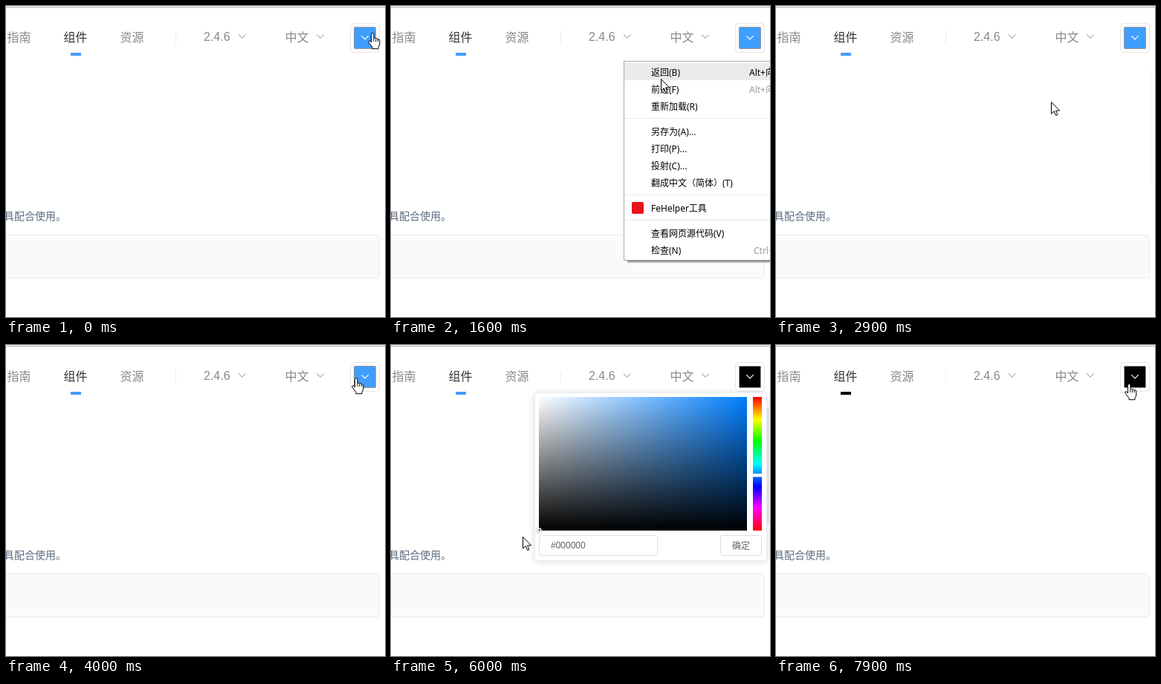
An HTML page that plays this animation: 510x419 px, repeating every 8 s.

```html
<!DOCTYPE html>
<html lang="zh-CN">
<head>
<meta charset="utf-8">
<title>Color picker</title>
<style>
html, body { margin: 0; width: 100%; height: 100%; overflow: hidden; background: #fff; }
svg { display: block; }
text { font-family: "Noto Sans", "Noto Sans CJK SC", "Noto Sans CJK", sans-serif; font-size: 12px; }
.nav text { font-size: 16px; fill: #888; font-family: "Liberation Sans", "Noto Sans CJK SC", "Noto Sans CJK", sans-serif; }
.nav .on { fill: #333; }
.chev { fill: none; stroke: #b4b4b4; stroke-width: 1.1; }
.form { fill: #606266; }
.form text { font-family: "Liberation Sans", "Noto Sans CJK SC", "Noto Sans CJK", sans-serif; }
.form rect { fill: #fff; stroke: #dcdfe6; }
.key { fill: #999; }
.sheet { filter: drop-shadow(5px 2px 1px rgba(0, 0, 0, .5)); }
#popup { transform-origin: 349px 64px; filter: drop-shadow(0 1px 4px rgba(0, 0, 0, .15)); }

#mark, #bar, #menu, #row, #key1, #key2, #popup, #hand, #arrow, #cursor { animation: 8s step-end infinite; }
#mark { animation-name: mark; }
#bar { animation-name: bar; }
#menu { animation-name: menu; }
#row { animation-name: row; }
#key1 { animation-name: key1; }
#key2 { animation-name: key2; }
#popup { animation-name: popup; }
#hand { animation-name: hand; }
#arrow { animation-name: arrow; }
#cursor { animation-name: cursor; }

@keyframes mark { 0% { fill: #409eff; } 87.5%, 100% { fill: #000; } }
@keyframes bar {
  0% { opacity: 0; }
  28.75% { opacity: .03; }
  50% { opacity: 0; }
  66.25% { opacity: .17; }
  96.25%, 100% { opacity: 0; }
}
@keyframes menu {
  0% { visibility: hidden; }
  6.25% { visibility: visible; }
  28.75%, 100% { visibility: hidden; }
}
@keyframes row {
  0% { opacity: 0; transform: translateY(0); }
  8.75% { opacity: 1; transform: translateY(0); }
  21.25% { opacity: 1; transform: translateY(23px); }
  26.25% { opacity: 1; transform: translateY(46px); }
  28.75%, 100% { opacity: 0; transform: translateY(46px); }
}
@keyframes key1 { 0% { fill: #999; } 8.75% { fill: #000; } 21.25%, 100% { fill: #999; } }
@keyframes key2 { 0% { fill: #999; } 21.25% { fill: #000; } 26.25%, 100% { fill: #999; } }
@keyframes popup {
  0% { opacity: 0; transform: scaleY(0); }
  55% { opacity: .6; transform: scaleY(.75); }
  56.25% { opacity: .95; transform: scaleY(.97); }
  57.5% { opacity: 1; transform: none; }
  85% { opacity: .7; transform: scaleY(.85); }
  86.25% { opacity: .2; transform: scaleY(.35); }
  87.5%, 100% { opacity: 0; transform: scaleY(0); }
}
@keyframes hand {
  0% { visibility: visible; }
  1.25% { visibility: hidden; }
  50% { visibility: visible; }
  58.75% { visibility: hidden; }
  82.5% { visibility: visible; }
  86.25% { visibility: hidden; }
  95%, 100% { visibility: visible; }
}
@keyframes arrow {
  0% { visibility: hidden; }
  1.25% { visibility: visible; }
  50% { visibility: hidden; }
  58.75% { visibility: visible; }
  82.5% { visibility: hidden; }
  86.25% { visibility: visible; }
  95%, 100% { visibility: hidden; }
}
/* the pointer advances once every 100 ms */
@keyframes cursor {
  0% { transform: translate(493px, 36px); animation-timing-function: steps(3); }
  3.75% { transform: translate(309px, 75px); }
  6.25% { transform: translate(314px, 77px); }
  7.5% { transform: translate(314px, 77px); animation-timing-function: steps(9); }
  18.75% { transform: translate(362px, 91px); }
  20% { transform: translate(363px, 98px); animation-timing-function: steps(5); }
  26.25% { transform: translate(370px, 129px); }
  36.25% { transform: translate(370px, 129px); animation-timing-function: steps(2); }
  38.75% { transform: translate(386px, 118px); animation-timing-function: steps(9); }
  50% { transform: translate(471px, 44px); }
  57.5% { transform: translate(471px, 44px); animation-timing-function: steps(6); }
  65% { transform: translate(330px, 150px); animation-timing-function: steps(8); }
  75% { transform: translate(177px, 258px); }
  76.25% { transform: translate(177px, 258px); animation-timing-function: steps(5); }
  82.5% { transform: translate(468px, 266px); }
  87.5% { transform: translate(468px, 266px); animation-timing-function: steps(6); }
  95% { transform: translate(475px, 57px); }
  96.25% { transform: translate(475px, 53px); }
  98.75%, 100% { transform: translate(475px, 52px); }
}
</style>
</head>
<body>
<svg width="510" height="419" viewBox="0 0 510 419">
  <defs>
    <linearGradient id="white"><stop stop-color="#fff"/><stop offset="1" stop-color="#fff" stop-opacity="0"/></linearGradient>
    <linearGradient id="black" x2="0" y2="1"><stop stop-opacity="0"/><stop offset="1"/></linearGradient>
    <linearGradient id="hues" x2="0" y2="1">
      <stop stop-color="#f00"/><stop offset=".17" stop-color="#ff0"/><stop offset=".33" stop-color="#0f0"/>
      <stop offset=".5" stop-color="#0ff"/><stop offset=".67" stop-color="#00f"/><stop offset=".83" stop-color="#f0f"/>
      <stop offset="1" stop-color="#f00"/>
    </linearGradient>
  </defs>

  <rect y="1" width="510" height="1" fill="#aaa"/>
  <g class="nav">
    <text x="1.5" y="47.5">指南</text>
    <text class="on" x="77.5" y="47.5">组件</text>
    <text x="153.5" y="47.5">资源</text>
    <text x="266" y="47">2.4.6</text>
    <text x="375.5" y="47.5">中文</text>
  </g>
  <rect id="mark" x="87" y="63" width="14" height="4"/>
  <rect x="228" y="34" width="1" height="16" fill="#ebebeb"/>
  <path class="chev" d="M313 38.5l4.7 4.7 4.7-4.7M418.3 38.5l4.7 4.7 4.7-4.7"/>
  <rect x="463.5" y="23.5" width="39" height="39" rx="4" fill="#fff" stroke="#e6e6e6"/>
  <rect id="swatch" x="468.5" y="28.5" width="29" height="29" rx="1" fill="#409eff" stroke="#999"/>
  <path d="M478.3 40.2l4.7 4.7 4.7-4.7" fill="none" stroke="#fff" stroke-width="1.2"/>

  <text x="-3" y="288" fill="#5e6d82" style="font-size:14px">具配合使用。</text>
  <rect x="-8" y="308.5" width="510.5" height="58" rx="4" fill="#fafafa" stroke="#ebebeb"/>
  <rect id="bar" x="503" y="85" width="6" height="156" rx="3" fill="#909399"/>

  <g id="popup">
    <rect x="193.5" y="64.5" width="312" height="226" rx="4" fill="#fff" stroke="#ebeef5"/>
    <rect x="199" y="70" width="280" height="180" fill="#007eff"/>
    <rect x="199" y="70" width="280" height="180" fill="url(#white)"/>
    <rect x="199" y="70" width="280" height="180" fill="url(#black)"/>
    <rect x="487" y="70" width="12" height="180" fill="url(#hues)"/>
    <rect x="486.5" y="173.5" width="13" height="4" rx="1" fill="#fff" stroke="#ddd" stroke-width=".6"/>
    <g id="knob" fill="none">
      <circle r="3.8" stroke="#888" stroke-width=".7"/>
      <circle r="2.7" stroke="#fff" stroke-width="1.6"/>
      <circle r="1.6" stroke="#000" stroke-opacity=".4" stroke-width=".7"/>
    </g>
    <g class="form">
      <rect x="199.5" y="256.5" width="159" height="27" rx="3"/>
      <text id="hex" x="215" y="274">#409EFF</text>
      <rect x="443.5" y="256.5" width="55" height="27" rx="3"/>
      <text x="459" y="274.5">确定</text>
    </g>
  </g>

  <g id="menu">
    <rect class="sheet" x="313.5" y="74.5" width="230" height="268" fill="#fff" stroke="#a8a8a8"/>
    <rect id="row" x="314" y="77" width="200" height="23" fill="#ebebeb"/>
    <path d="M314 151.5h200M314 254.5h200M314 288.5h200" stroke="#e9e9e9"/>
    <rect x="324" y="264" width="16" height="16" rx="2" fill="#e8141c"/>
    <text x="350" y="94">返回(B)</text>
    <text x="350" y="117">前进(F)</text>
    <text x="350" y="140">重新加载(R)</text>
    <text x="350" y="174">另存为(A)...</text>
    <text x="350" y="197">打印(P)...</text>
    <text x="350" y="220">投射(C)...</text>
    <text x="350" y="243">翻成中文（简体）(T)</text>
    <text x="350" y="277">FeHelper工具</text>
    <text x="350" y="311">查看网页源代码(V)</text>
    <text x="350" y="334">检查(N)</text>
    <text id="key1" x="482" y="94">Alt+向左箭头</text>
    <text id="key2" x="482" y="117">Alt+向右箭头</text>
    <text class="key" x="488" y="334">Ctrl+Shift+I</text>
  </g>

  <g id="cursor" fill="#fff" stroke="#000" stroke-linejoin="round">
    <path id="arrow" d="M.5.5V16.3l3.7-3.5 2.5 5.7 2.3-1-2.5-5.5h5.1z"/>
    <g id="hand">
      <path transform="translate(-6)" d="M4.5 13V2.2a1.7 1.7 0 0 1 3.4 0V7.5q1.7-.9 2.8.4 1.6-.6 2.6.7 2.2-.2 2.5 1.7v4.7q0 2-1.8 4.2v2.5H6v-2.200L1 13q-1-2 .7-2.2 1.300 0 2.800 2.200z"/>
      <path d="M1.900 8v4M4.700 8.400V12M7.300 9V12" fill="none" stroke-width=".9"/>
    </g>
  </g>
</svg>
<script>
const $ = id => document.getElementById(id);
const clamp = (v, lo, hi) => Math.min(hi, Math.max(lo, v));
const mix = (a, b, k) => a + (b - a) * k;
const HUE = [0, .494, 1];
const pane = { x: 199, y: 70, w: 280, h: 180 };
const start = performance.now();

function toHex(s, v) {
  return '#' + HUE.map(c => Math.round(255 * v * mix(1, c, s)).toString(16).padStart(2, '0')).join('').toUpperCase();
}

// Dragging in the pane picks saturation and value.
function draw() {
  const t = Math.floor((performance.now() - start) % 8000 / 100) * 100;
  let x = 409, y = 70, hex = '#409EFF';
  if (t >= 5300) {
    const k = Math.min(1, (t - 5200) / 800);
    x = clamp(mix(330, 177, k), pane.x, pane.x + pane.w);
    y = clamp(mix(150, 258, k), pane.y, pane.y + pane.h);
    hex = toHex((x - pane.x) / pane.w, 1 - (y - pane.y) / pane.h);
  }
  $('knob').setAttribute('transform', `translate(${x} ${y})`);
  $('swatch').setAttribute('fill', hex);
  $('hex').textContent = hex;
  requestAnimationFrame(draw);
}
draw();
</script>
</body>
</html>
```
